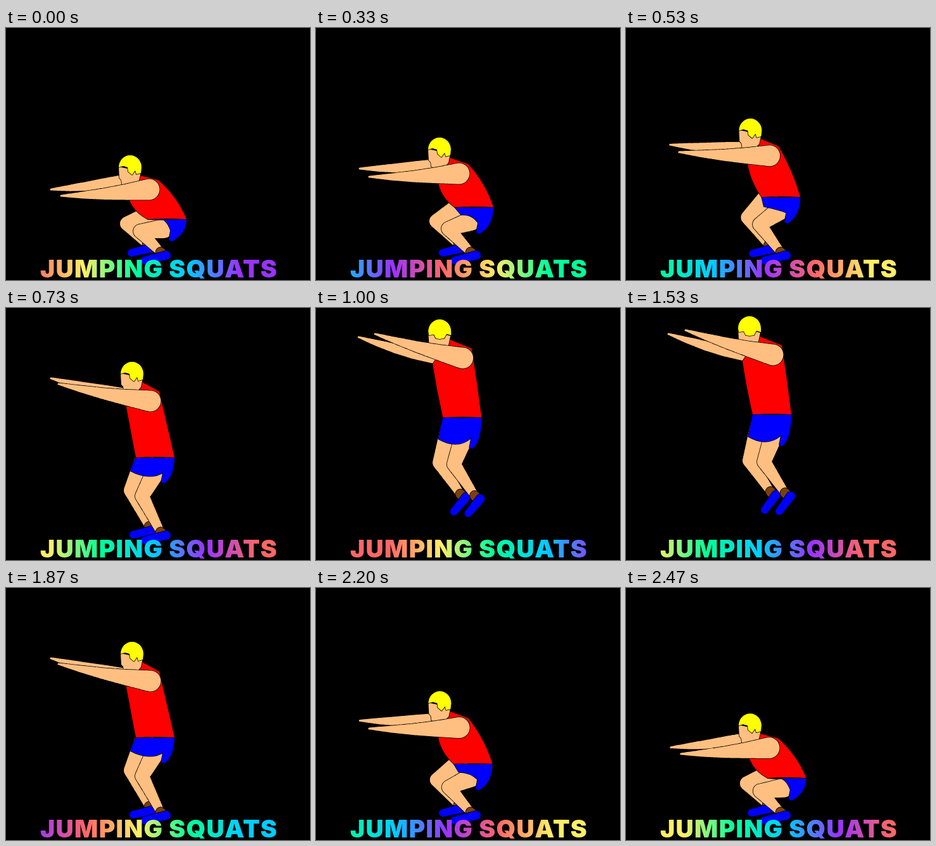
These frames come from a looping animation (480x398 px, 2.54 s). An HTML page with a canvas:

```html
<!DOCTYPE html>
<html lang="en">
<head>
<meta charset="utf-8">
<title>Jumping squats</title>
<style>
  html, body { margin: 0; width: 100%; height: 100%; overflow: hidden; background: #000; }
  canvas { display: block; }
</style>
</head>
<body>
<canvas id="stage" width="480" height="398"></canvas>
<script>
const ctx = document.getElementById('stage').getContext('2d');
const LOOP = 2540, TICKS = 38;
const SKIN = '#ffbf80', RED = '#f00', BLUE = '#00f', YELLOW = '#ff0', BROWN = '#7a4010';

// Joints of each key pose. "far" is the shift from the near leg to the far one,
// "toe" the direction from ankle to toe.
const floor = { ankle: [244, 354], toe: [-25, 13] };
const squat = {
  ...floor, far: [-21, -12], head: [196, 201], shoulder: [226, 255], hand: [87, 265], farHand: [71, 255],
  chest: [191, 250], waist: [224, 302], hem: [236, 302], hip: [249, 317], knee: [212, 321]
};
const rising = {
  ...floor, far: [-19, -12], head: [195, 173], shoulder: [226, 230], hand: [84, 235], farHand: [69, 222],
  chest: [192, 226], waist: [219, 283], hem: [229, 295], hip: [245, 305], knee: [209, 317]
};
const standing = {
  ...floor, far: [-18, -9], head: [199, 85], shoulder: [228, 147], hand: [83, 120], farHand: [71, 111],
  chest: [188, 146], waist: [205, 236], hem: [196, 257], hip: [237, 257], knee: [215, 297]
};
const flying = {
  ankle: [251, 292], toe: [-9, 29], far: [-23, -2], head: [195, 13], shoulder: [232, 74], hand: [94, 35], farHand: [67, 41],
  chest: [184, 84], waist: [200, 168], hem: [193, 203], hip: [234, 198], knee: [218, 243]
};
const tucked = {
  ankle: [251, 235], toe: [-3, 31], far: [-24, 4], head: [192, 18], shoulder: [231, 77], hand: [92, 41], farHand: [69, 39],
  chest: [183, 86], waist: [208, 165], hem: [199, 181], hip: [245, 194], knee: [203, 212]
};
const poses = [squat, rising, standing, flying, tucked];

// [tick, position along the poses]; the second half plays backwards
const timeline = [[0, 0], [1, 0], [2, .1], [5, 1], [8, 1.34], [11, 2], [15, 2.93], [16, 3], [18, 4], [20, 4]];

const face = [[-18, 18], [-17, 36], [-14, 39], [-13, 46], [-6, 49], [5, 49], [14, 40], [17, 26]];
const sideFringe = [[17, 28], [10, 30], [8, 24], [3, 31], [-3, 26], [-4, 19], [-11, 17]];
const backFringe = [[18, 25], [11, 23], [7, 30], [0, 31], [-6, 30], [-9, 24], [-17, 25]];
const rainbow = ['#ff6666', '#ffee66', '#00ff99', '#00ccff', '#9933ff'];

const mix = (a, b, k) => a + (b - a) * k;
const mixPoint = (a, b, k) => [mix(a[0], b[0], k), mix(a[1], b[1], k)];
const add = ([x, y], [dx, dy]) => [x + dx, y + dy];

function poseAt(tick) {
  const t = Math.min(tick, 39 - tick);
  const n = timeline.findIndex(([end]) => end > t);
  const [t0, p0] = timeline[n - 1], [t1, p1] = timeline[n];
  const position = mix(p0, p1, (t - t0) / (t1 - t0));
  const index = Math.min(Math.floor(position), poses.length - 2);
  const pose = { fringe: position > 2.5 ? backFringe : sideFringe };
  for (const joint in squat) pose[joint] = mixPoint(poses[index][joint], poses[index + 1][joint], position - index);
  return pose;
}

// Stroking before filling leaves only the outer outline
function paint(color) {
  ctx.fillStyle = color;
  ctx.stroke();
  ctx.fill();
}

// Tapered body part: a chain of circles along the joints
function limb(color, joints, radii) {
  const steps = 24;
  ctx.beginPath();
  for (let i = 0; i < joints.length - 1; i++)
    for (let s = 0; s <= steps; s++) {
      const [x, y] = mixPoint(joints[i], joints[i + 1], s / steps);
      const r = mix(radii[i], radii[i + 1], s / steps);
      ctx.moveTo(x + r, y);
      ctx.arc(x, y, r, 0, 2 * Math.PI);
    }
  paint(color);
}

function arm(hand, shoulder, radii) {
  const joints = radii.map((_, i) => {
    const k = i / (radii.length - 1);
    return add(mixPoint(hand, shoulder, k), [0, 2 * Math.sin(Math.PI * k)]);
  });
  limb(SKIN, joints, radii);
}

function leg(hip, knee, ankle, toe) {
  limb(SKIN, [hip, knee, ankle], [15, 11, 6.5]);
  limb(BROWN, [ankle, add(ankle, [2, 2])], [7.5, 7.5]);
  limb(BLUE, [add(ankle, [9, 5]), add(ankle, toe)], [7, 6]);
}

function curveTo(from, to, bulge) {
  const [dx, dy] = [to[0] - from[0], to[1] - from[1]];
  const k = 2 * bulge / Math.hypot(dx, dy);
  ctx.quadraticCurveTo(...add(mixPoint(from, to, .5), [dy * k, -dx * k]), ...to);
}

function drawTorso({ head, shoulder, chest, waist }) {
  const upperBack = add(shoulder, [14, -15]), waistBack = add(waist, [61, 0]);
  // The belly swells as the trunk shortens
  const belly = Math.max(0, 88 - Math.hypot(chest[0] - waist[0], chest[1] - waist[1])) * .35;
  ctx.beginPath();
  ctx.moveTo(...add(head, [16, 32]));
  ctx.lineTo(...upperBack);
  curveTo(upperBack, waistBack, belly / 2);
  curveTo(waistBack, waist, -1);
  curveTo(waist, chest, belly);
  ctx.closePath();
  paint(RED);
}

function drawShorts({ waist, hem, hip, knee }) {
  const waistBack = add(waist, [61, 0]), hemBack = add(hip, [13, 20]), notch = add(hip, [11, 3]);
  const drop = (knee[1] - hip[1] - 22) * .8;
  ctx.beginPath();
  ctx.moveTo(...waist);
  curveTo(waist, waistBack, -1);
  ctx.quadraticCurveTo(waistBack[0], hemBack[1] - 12, ...hemBack);
  ctx.lineTo(hemBack[0] - 5, hemBack[1] - 2);
  ctx.lineTo(...notch);
  ctx.quadraticCurveTo(...add(mixPoint(notch, hem, .5), [4, drop]), ...hem);
  ctx.closePath();
  paint(BLUE);
}

function drawHead({ head, fringe }) {
  ctx.save();
  ctx.translate(...head);
  ctx.beginPath();
  face.forEach(point => ctx.lineTo(...point));
  ctx.closePath();
  paint(SKIN);
  ctx.beginPath();
  ctx.ellipse(0, 19, 18, 19, 0, Math.PI, 2 * Math.PI);
  fringe.forEach(point => ctx.lineTo(...point));
  ctx.closePath();
  paint(YELLOW);
  ctx.restore();
}

function drawFigure(pose) {
  const { hip, knee, ankle, toe, far } = pose;
  ctx.strokeStyle = '#000';
  ctx.lineWidth = 1.6;
  ctx.lineJoin = 'round';
  arm(pose.farHand, add(pose.chest, [0, -10]), [1.5, 5, 7.5, 9, 9]);
  leg(add(add(hip, far), [0, -10]), add(knee, far), add(ankle, far), toe);
  leg(hip, knee, ankle, toe);
  drawShorts(pose);
  drawTorso(pose);
  drawHead(pose);
  arm(pose.hand, pose.shoulder, [1.5, 5.5, 9, 12.5, 16.5]);
}

// Evenly spaced colours slide right and wrap around within the title's box
function drawTitle(tick) {
  const left = 36, width = 410;
  const gradient = ctx.createLinearGradient(left, 0, left + width, 0);
  rainbow.forEach((color, i) => gradient.addColorStop((.01 + tick / TICKS * 3 + i / rainbow.length) % 1, color));
  ctx.font = '900 39px Inter, sans-serif';
  ctx.letterSpacing = '1.3px';
  ctx.textAlign = 'center';
  ctx.fillStyle = gradient;
  ctx.fillText('JUMPING SQUATS', 241.5, 394);
}

function draw() {
  const tick = Math.floor(performance.now() % LOOP / LOOP * TICKS + .15) % TICKS;
  ctx.fillStyle = '#000';
  ctx.fillRect(0, 0, 480, 398);
  drawFigure(poseAt(tick));
  drawTitle(tick);
  requestAnimationFrame(draw);
}
draw();
</script>
</body>
</html>
```
